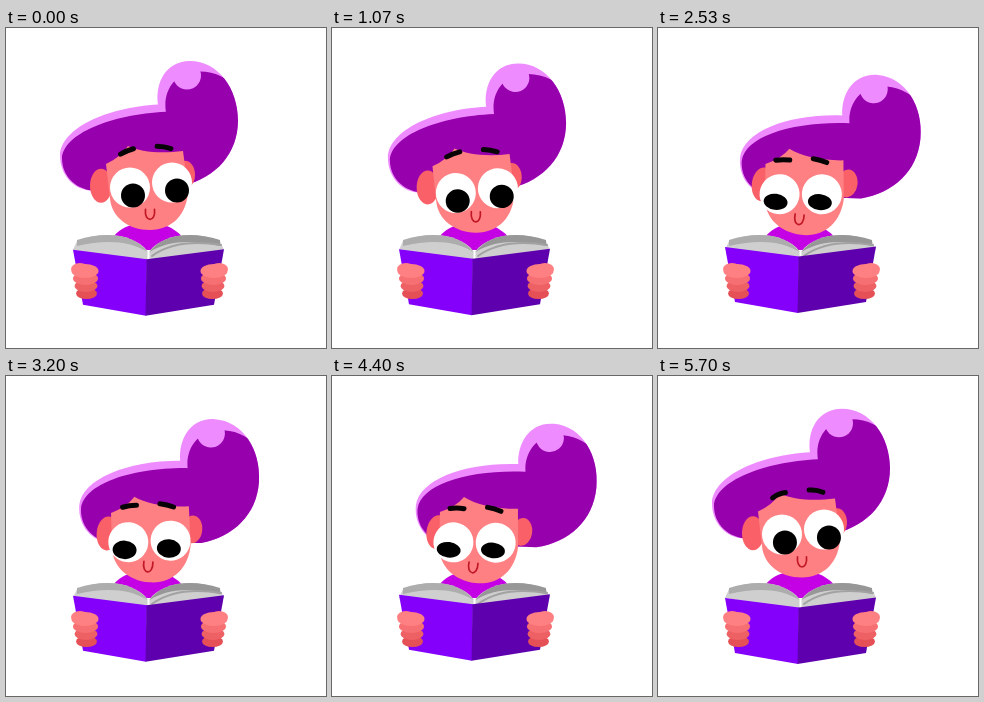
Recreate the animation shown at these times as an HTML page with a canvas. Size 320 by 320 pixels, loop 5730 ms.

```html
<!DOCTYPE html>
<html>
<head>
<meta charset="utf-8">
<style>
html, body { margin: 0; width: 100%; height: 100%; overflow: hidden; background: #fff; }
canvas { display: block; width: 320px; height: 320px; }
</style>
</head>
<body>
<canvas id="stage"></canvas>
<script>
const LOOP = 5730, SWING = LOOP / 6;
const SKIN = '#ff8083', BLUSH = '#fa6068', LIGHT = '#ee8cff', DARK = '#9700ad';
const canvas = document.getElementById('stage');
const ctx = canvas.getContext('2d');
const dpr = window.devicePixelRatio || 1;
canvas.width = canvas.height = 320 * dpr;

const hair = new Path2D('M54 127C55 100 100 79 152 76C149 54 160 32.5 184 32.5' +
  'C212 32.5 232 60 232 92C232 125 210 149 178 157L90 162C70 164 54 148 54 127Z');
const face = new Path2D('M100 135Q115 128 122 117C134 123 155 125 177 122L182 160' +
  'C182 185 166 201 144 201C122 201 106 188 104 170Z');

const clamp = v => Math.min(1, Math.max(0, v));
const smooth = (t, a, b) => { const u = clamp((t - a) / (b - a)); return u * u * (3 - 2 * u); };
const smoother = (t, a, b) => {
  const u = clamp((t - a) / (b - a));
  return u * u * u * (u * (6 * u - 15) + 10);
};

function fill(path, color) {
  ctx.fillStyle = color;
  ctx.fill(typeof path === 'string' ? new Path2D(path) : path);
}
function oval(x, y, rx, ry, color) {
  ctx.beginPath();
  ctx.ellipse(x, y, rx, ry, 0, 0, 7);
  ctx.fillStyle = color;
  ctx.fill();
}
function stroke(d, color, width) {
  ctx.strokeStyle = color;
  ctx.lineWidth = width;
  ctx.lineCap = 'round';
  ctx.stroke(new Path2D(d));
}
function at(x, y, angle, draw) {
  ctx.save();
  ctx.translate(x, y);
  ctx.rotate(angle);
  draw();
  ctx.restore();
}
function mirror(axis, draw) {
  ctx.save();
  ctx.translate(2 * axis, 0);
  ctx.scale(-1, 1);
  draw();
  ctx.restore();
}

function drawHair(side, dip) {
  // The hair swings stiffly about the tip of its left lobe.
  at(54 + 28 * side, 128 + 2.5 * dip, 0.09 * side, () => {
    ctx.translate(-54, -128);
    fill(hair, LIGHT);
    ctx.clip(hair);
    ctx.save();
    ctx.translate(56, 164);
    ctx.scale(1.06, 0.92);
    ctx.translate(-54, -164);
    fill(hair, DARK);
    ctx.restore();
    oval(181, 47, 14, 14, LIGHT);
  });
}

function drawHead(side, dip, phase) {
  // Near features slide against the turn, the ears slide with it.
  const part = (dx, dy, draw) =>
    at(144 + dx * side, 186 + dy, 0.12 * side, () => { ctx.translate(-144, -186); draw(); });
  const drop = 8.5 * dip + 2.5 * side;

  part(6, 3 * dip + 2 * side, () => {
    oval(95, 157, 11, 17, BLUSH);
    oval(179, 146, 10, 14, BLUSH);
  });
  part(1, 4 * dip + 2 * side, () => fill(face, SKIN));
  part(-3, 3.5 * dip + 2.5 * side, () =>
    stroke('M139.5 180.5C138 194 150 194 148.5 180.5', '#c01824', 1.7));

  const gaze = 3.8 * Math.cos(2 * Math.PI * phase / SWING) - 0.8;
  part(-6, drop, () => {
    oval(124, 157.5, 20, 20, '#fff');
    oval(166, 152.5, 20, 20, '#fff');
    for (const [x, y] of [[124, 157.5], [168, 152.5]])
      oval(x + gaze, y + 8, 12, 12 - 4 * side, '#000');
  });

  const raise = smooth(phase, 800, 900) * (1 - smooth(phase, 920, 960));
  const brow = `M-7 0Q0 ${-1 - raise} 7 0`;
  part(-4, 4 * dip + 8 * side - 4 * raise, () => {
    at(121, 122.5, -0.4 + 0.27 * side, () => stroke(brow, '#080406', 5));
    at(158, 118.5, 0.16, () => stroke(brow, '#080406', 5));
  });
}

function drawPage(shade) {
  fill('M67 222L71 213C100 202 128 207 141.5 223V233Z', '#cfcfcf');
  fill('M71 212C100 203 128 206 141.5 224C122 212 98 212 71 218Z', shade);
}

function drawHand() {
  for (let i = 3; i >= 0; i--)
    oval(79 + i / 2, 243 + 7.5 * i, 13.5 - i, 7 - i / 2, `rgb(${255 - 9 * i},${128 - 16 * i},${130 - 15 * i})`);
  oval(74, 241, 9, 6, SKIN);
}

function drawBook(side, dip) {
  drawPage('#adadad');
  mirror(142.5, () => {
    drawPage('#979797');
    stroke('M70 217C102 212 124 217 139 228', '#a2a2a2', 2);
  });
  at(0, -2.3 * side - 0.7 * dip, 0, () => {
    fill('M67 222L141 231.5L140 288L77 277Z', '#8400fb');
    fill('M140.5 231.5L218 221.500L208 277L139.500 288Z', '#5e00ae');
  });
  drawHand();
  mirror(143.5, drawHand);
}

function frame(now) {
  let t = now % LOOP;
  if (t % 600 < 70) t -= t % 600; // short hold at every 600 ms
  const phase = t % SWING;
  const side = 1.075 * smooth(phase, 40, 540) * (1 - smoother(phase, 540, 915));
  const wrapped = phase > 870 ? phase - SWING : phase;
  const dip = smooth(wrapped, -80, 170) * (1 - smoother(wrapped, 590, 870));

  ctx.setTransform(dpr, 0, 0, dpr, 0, 0);
  ctx.fillStyle = '#fff';
  ctx.fillRect(0, 0, 320, 320);
  drawHair(side, dip);
  fill('M100 222C107 202 122 195 142 195C162 195 176 203 184 222Z', '#c400e4');
  drawHead(side, dip, phase);
  drawBook(side, dip);
}

const start = performance.now();
function tick() {
  frame(performance.now() - start);
  requestAnimationFrame(tick);
}
tick();
</script>
</body>
</html>
```
